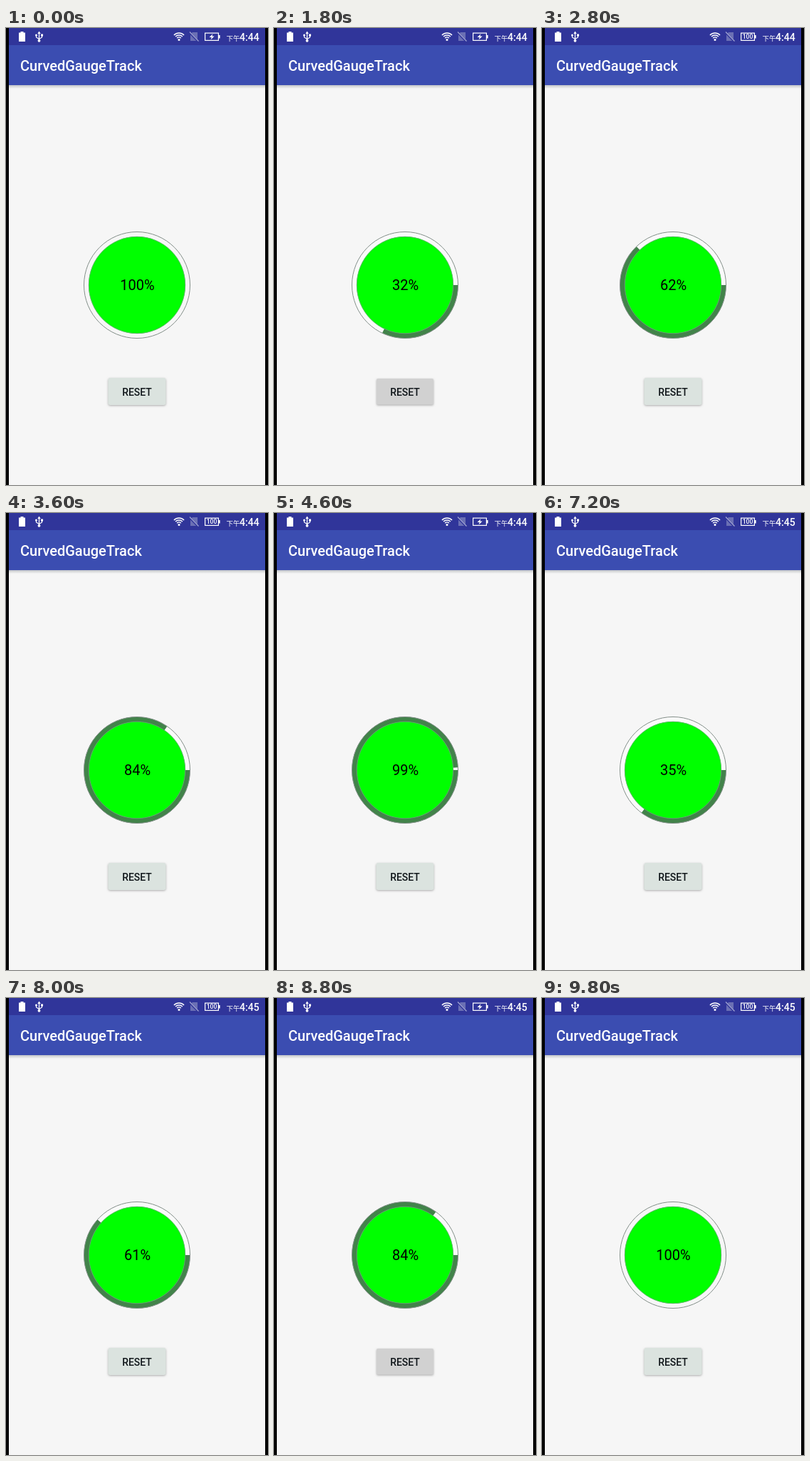
Write an HTML page with a canvas that moves like this. It is 368x640 px and loops after 10 s.

```html
<!DOCTYPE html>
<html lang="en">
<head>
<meta charset="utf-8">
<title>Round progress</title>
<style>
html, body { margin: 0; width: 100%; height: 100%; overflow: hidden; background: #000; }
canvas { display: block; width: 368px; height: 640px; }
</style>
</head>
<body>
<canvas id="stage" width="368" height="640"></canvas>
<script>
const ctx = document.getElementById('stage').getContext('2d');
const LOOP = 10000, STEP = 200, TAU = Math.PI * 2;
const CX = 184, CY = 360;
const RUNS = [
  { from: 200, start: -116, length: 5000 },
  { from: 5400, start: 5310, length: 4680 }
];

function progressAt(t) {
  const run = RUNS.filter(r => t >= r.from).pop();
  if (!run) return 1;
  const x = Math.min(1, (t - run.start) / run.length);
  const p = (1 - Math.cos(Math.PI * x)) / 2;
  return p > 0.995 ? 1 : p;
}

function rect(x, y, w, h, color) {
  ctx.fillStyle = color;
  ctx.fillRect(x, y, w, h);
}

function round(x, y, w, h, r, color) {
  ctx.fillStyle = color;
  ctx.beginPath();
  ctx.roundRect(x, y, w, h, r);
  ctx.fill();
}

function disc(x, y, r, color) {
  ctx.fillStyle = color;
  ctx.beginPath();
  ctx.arc(x, y, r, 0, TAU);
  ctx.fill();
}

function arc(x, y, r, a, b, color, width) {
  ctx.strokeStyle = color;
  ctx.lineWidth = width;
  ctx.beginPath();
  ctx.arc(x, y, r, a, b);
  ctx.stroke();
}

function poly(points, color, width) {
  ctx.beginPath();
  points.forEach(([x, y]) => ctx.lineTo(x, y));
  if (width) {
    ctx.strokeStyle = color;
    ctx.lineWidth = width;
    ctx.stroke();
  } else {
    ctx.fillStyle = color;
    ctx.fill();
  }
}

function text(s, x, y, font, color, align = 'left') {
  ctx.font = font;
  ctx.fillStyle = color;
  ctx.textAlign = align;
  ctx.fillText(s, x, y);
}

function usbIcon() {
  poly([[46.5, 7], [46.5, 17]], '#fff', 1.3);
  poly([[42.5, 10], [42.5, 13], [46.5, 15.5], [50.5, 13], [50.5, 10]], '#fff', 1.2);
  poly([[44.3, 8], [46.5, 4.5], [48.7, 8]], '#fff');
  disc(42.5, 10, 1.5, '#fff');
  rect(49, 8.5, 3, 3, '#fff');
  disc(46.5, 17.8, 1.9, '#fff');
}

function wifiIcon() {
  [4, 7, 10].forEach(r =>
    arc(243, 17, r, -Math.PI * 0.75, -Math.PI * 0.25, '#fff', 1.4));
  disc(243, 16.5, 1.5, '#fff');
}

function noSimIcon() {
  poly([[262, 6], [269, 6], [269, 18], [259, 18], [259, 9]], '#6b70b4');
  poly([[257.5, 6], [270, 19]], '#30359a', 2.6);
  poly([[258, 5.5], [270.5, 18.5]], '#a2a5d2', 1.2);
}

function chargeIcon(charging) {
  ctx.strokeStyle = '#fff';
  ctx.lineWidth = 1.2;
  ctx.strokeRect(279.6, 7.1, 18.8, 10.3);
  rect(299, 10, 1.6, 4.5, '#fff');
  if (charging) {
    poly([[290.5, 8.2], [285.5, 13], [288.7, 13], [287.5, 16.4], [292.6, 11.6], [289.4, 11.6]], '#fff');
  } else {
    text('100', 289, 15.4, '500 8.5px Roboto, sans-serif', '#fff', 'center');
  }
}

function statusBar(t) {
  rect(4, 0, 360, 24, '#30359a');
  rect(18, 6.5, 9, 12.5, '#fff');
  rect(20.5, 5, 4, 2, '#fff');
  usbIcon();
  wifiIcon();
  noSimIcon();
  chargeIcon((t + 700) % 2200 < 1100);
  text('下午', 309.5, 17.5, '9.5px "Noto Sans CJK SC", "Noto Sans CJK", sans-serif', '#fff');
  text(t < 6400 ? '4:44' : '4:45', 328, 17.5, '500 14px Roboto, sans-serif', '#fff');
}

function toolbar() {
  const shade = ctx.createLinearGradient(0, 80, 0, 85);
  shade.addColorStop(0, '#c3c6c8');
  shade.addColorStop(1, '#f6f6f6');
  rect(4, 80, 360, 5, shade);
  rect(4, 24, 360, 56, '#3b4db1');
  text('CurvedGaugeTrack', 20, 60, '500 20px Roboto, sans-serif', '#fff');
}

function dial(p) {
  const moving = p < 1;
  if (moving) disc(CX, CY, 74.5, '#fafafa');
  disc(CX, CY, 68, '#00ff00');
  if (moving) arc(CX, CY, 71, 0, p * TAU, '#42834a', 7);
  arc(CX, CY, 74.5, 0, TAU, '#84908a', 1);
  arc(CX, CY, 67.7, 0, TAU, '#6aa878', 0.8);
  text(Math.floor(p * 100) + '%', CX + 0.5, 367, '20px Roboto, sans-serif', '#000', 'center');
}

function button(t) {
  const gray = [1800, 8800].some(at => Math.abs(t - at) <= STEP);
  ctx.save();
  ctx.shadowColor = 'rgba(0,0,0,0.3)';
  ctx.shadowBlur = 3;
  ctx.shadowOffsetY = 1;
  if (gray) round(144, 491, 80, 36.5, 2, '#d1d1d1');
  else round(143.5, 490, 81, 38, 3, '#dbe3df');
  ctx.restore();
  text('RESET', CX, 514.5, '500 14px Roboto, sans-serif', '#10161a', 'center');
}

function draw(now) {
  const t = Math.floor((now % LOOP) / STEP) * STEP;
  rect(0, 0, 368, 640, '#000');
  rect(4, 0, 360, 640, '#f6f6f6');
  toolbar();
  statusBar(t);
  dial(progressAt(t));
  button(t);
}

let origin;
function tick(now) {
  origin ??= now;
  draw(now - origin);
  requestAnimationFrame(tick);
}
draw(0);
requestAnimationFrame(tick);
</script>
</body>
</html>
```
